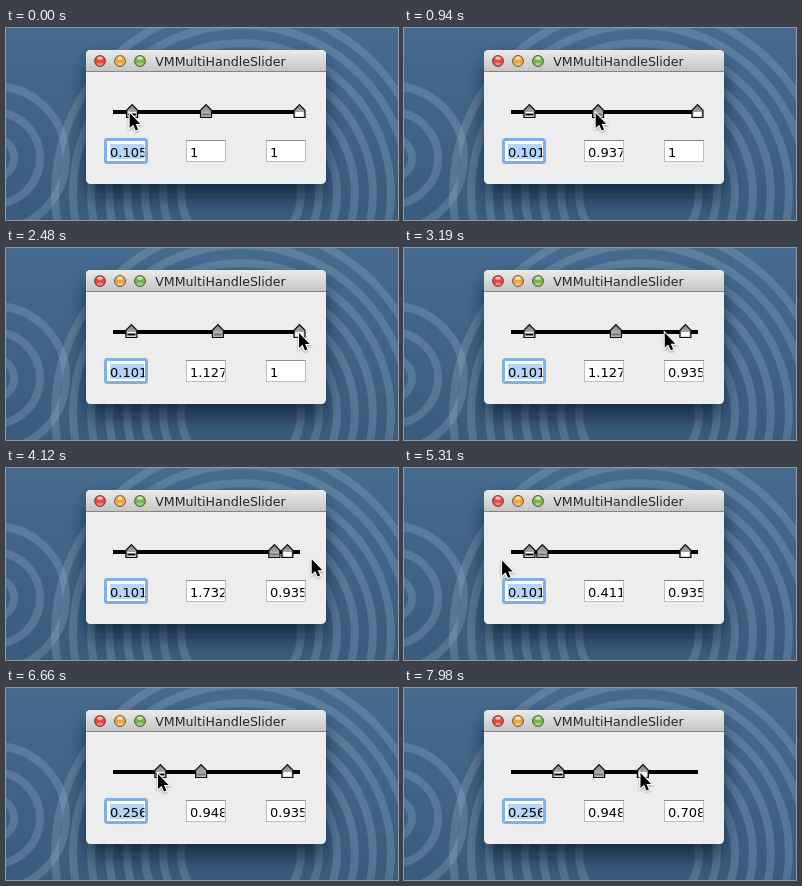
Recreate the animation shown at these times as an HTML page. Size 392x192 px, loop 8000 ms.

```html
<!DOCTYPE html>
<html lang="en">
<head>
<meta charset="utf-8">
<title>Multi-handle slider</title>
<style>
  html, body { margin: 0; width: 100%; height: 100%; overflow: hidden; background: #416487; }
  svg { display: block; width: 100%; height: 100%; }
  text { font: 12.6px "DejaVu Sans", sans-serif; }
  .value { font-size: 13px; }
</style>
</head>
<body>
<svg viewBox="0 0 392 192">
  <defs>
    <linearGradient id="desk" x2="0" y2="1">
      <stop stop-color="#466b8f"/><stop offset="1" stop-color="#395b7e"/>
    </linearGradient>
    <linearGradient id="bar" x2="0" y2="1">
      <stop stop-color="#ebebeb"/><stop offset="1" stop-color="#c6c6c6"/>
    </linearGradient>
    <linearGradient id="roof" x2="0" y2="1">
      <stop stop-color="#858585"/><stop offset="1" stop-color="#bdbdbd"/>
    </linearGradient>
    <filter id="blur" x="-30%" y="-30%" width="160%" height="160%"><feGaussianBlur stdDeviation="10"/></filter>
    <filter id="soft"><feGaussianBlur stdDeviation=".6"/></filter>
    <filter id="drop" x="-50%" y="-50%" width="200%" height="200%">
      <feDropShadow dx="0" dy="1" stdDeviation="1" flood-opacity=".4"/>
    </filter>
    <clipPath id="win"><rect x="80" y="22" width="240" height="134" rx="4.5"/></clipPath>
  </defs>
  <rect width="392" height="192" fill="url(#desk)"/>
  <g id="rings" fill="none" stroke="#a9c2d4" stroke-opacity=".24" stroke-width="8"/>
  <rect x="82" y="34" width="236" height="134" rx="6" fill="#00081a" opacity=".65" filter="url(#blur)"/>
  <g clip-path="url(#win)">
    <rect x="80" y="22" width="240" height="134" fill="#ededed"/>
    <rect x="80" y="22" width="240" height="21" fill="url(#bar)"/>
    <rect x="80" y="43" width="240" height="1" fill="#858585"/>
  </g>
  <g id="lights"/>
  <text x="214.5" y="38" text-anchor="middle" fill="#262626">VMMultiHandleSlider</text>
  <rect x="107" y="82" width="187" height="4"/>
  <g id="fields"/>
  <g id="handles"/>
  <g id="cursor"><path d="M0 0V15L3.5 11.8 6 17.4 8.4 16.4 6 11H10.6Z"
    stroke="#fff" stroke-width="2" paint-order="stroke" filter="url(#drop)"/></g>
</svg>
<script>
const $ = id => document.getElementById(id);
const LOOP = 8000, GAP = 13, GRIP = 2.9, LEFT = 107, WIDTH = 187;
const MAX = [1, 2, 1], REST = [126.6, 200.5, 294];

// Pointer moves: start, end, x, y, dragged handle
const moves = [
  [0, 60, 123, 85, 0],
  [115, 590, 197.6, 85],
  [830, 1150, 176.3, 85, 1],
  [1150, 1680, 209.5, 84, 1],
  [1740, 2250, 293.5, 85],
  [2430, 2920, 279, 85, 2],
  [2920, 3710, 212, 84],
  [3890, 4180, 317, 92, 1],
  [4180, 4650, 147, 90, 1],
  [4650, 5010, 89, 93, 1],
  [5224, 5700, 192.7, 88, 1],
  [5700, 6360, 126, 86],
  [6600, 6660, 152, 86, 0],
  [6960, 7440, 274, 85],
  [7680, 7980, 236.5, 85, 2]
];

const clamp = (v, lo, hi) => Math.max(lo, Math.min(hi, v));
const ease = u => u * u * (3 - 2 * u);

function pointer(t) {
  let x = 123.7, y = 85;
  for (const [start, end, toX, toY] of moves) {
    const u = ease(clamp((t - start) / (end - start), 0, 1));
    x += (toX - x) * u;
    y += (toY - y) * u;
  }
  return [x, y];
}

function dragged(i, t) {
  const drag = moves.findLast(m => m[4] === i && m[0] <= t);
  return drag ? pointer(Math.min(t, drag[1]))[0] + GRIP : REST[i];
}

const ringSet = (x, y, first, gap, count) => Array.from({ length: count }, (_, k) =>
  `<circle cx="${x}" cy="${y}" r="${first + k * gap}"/>`).join("");
$("rings").innerHTML = ringSet(235, 165, 60, 18, 8) + ringSet(-12, 130, 20, 26, 3);

$("lights").innerHTML = ["#e5493f", "#eca63a", "#79b648"].map((c, i) =>
  `<g transform="translate(${94 + i * 20} 33)">
   <circle r="5.5" fill="${c}" stroke="#000" stroke-opacity=".5"/>
   <ellipse cy="-2.8" rx="2.8" ry="1.6" fill="#fff" opacity=".65"/>
   <ellipse cy="3" rx="3" ry="1.6" fill="#fff" opacity=".35"/></g>`).join("");

const focus = `<rect x="-.5" y="-.5" width="41" height="23" rx="2" fill="none"
  stroke="#7db0e4" stroke-width="3" filter="url(#soft)"/>`;
const selection = '<rect x="4" y="4" width="34" height="15" fill="#b3d4fb"/>';
$("fields").innerHTML = [100, 180, 260].map((x, i) =>
  `<g transform="translate(${x} 112)">
   <clipPath id="c${i}"><rect x="3" width="35.5" height="22"/></clipPath>
   ${i ? "" : focus}
   <rect x=".5" y=".5" width="39" height="21" fill="#fff" stroke="${i ? "#bdbdbd" : "#86b2df"}"/>
   ${i ? '<rect width="40" height="1" fill="#8f8f8f"/>' : selection}
   <g clip-path="url(#c${i})"><text class="value" x="4" y="17"/></g></g>`).join("");

const marks = [["#fff", "#000"], ["#b4b4b4", "#777"], ["#fff", "#fff"]];
$("handles").innerHTML = marks.map(([fill, line]) =>
  `<g><path d="M-5.5 89.5V82.3L0 76.7 5.5 82.3V89.5Z" fill="url(#roof)" stroke="#0c0c0c" stroke-width="1.2"/>
   <rect x="-4" y="84" width="8" height="4.5" fill="${fill}"/>
   <rect x="-4" y="85.5" width="8" height="2" fill="${line}"/></g>`).join("");

const texts = document.querySelectorAll(".value");
const handles = $("handles").children;

function draw(now) {
  const t = now % LOOP;
  const a = dragged(0, t), b = dragged(1, t);
  const c = Math.min(dragged(2, t), LEFT + WIDTH);
  [a, clamp(b, a + GAP, c - GAP), c].forEach((x, i) => {
    handles[i].setAttribute("transform", `translate(${x - .5})`);
    // The middle value stops updating once its handle hits the left one
    const stuck = i === 1 && b < a + GAP;
    const value = stuck ? .411 : (x - LEFT) / WIDTH * MAX[i];
    texts[i].textContent = +value.toFixed(3);
  });
  $("cursor").setAttribute("transform", `translate(${pointer(t)})`);
  requestAnimationFrame(draw);
}
requestAnimationFrame(draw);
</script>
</body>
</html>
```
